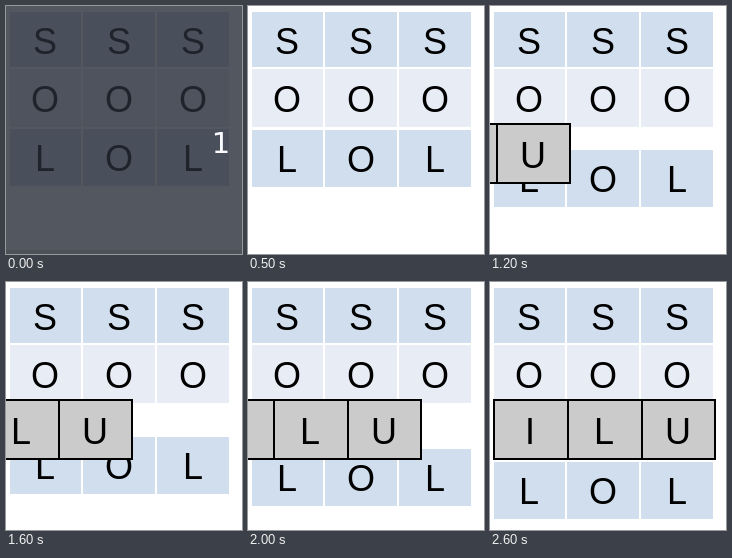
Write an HTML page with a canvas that moves like this. It is 236 px wide and 248 px high and loops after 3400 ms.

```html
<!DOCTYPE html>
<html lang="en">
<head>
<meta charset="utf-8">
<title>Row insertion</title>
<style>
html, body { margin: 0; width: 100%; height: 100%; overflow: hidden; background: #fff; }
canvas { display: block; }
</style>
</head>
<body>
<canvas id="stage" width="236" height="248"></canvas>
<script>
const ctx = document.getElementById('stage').getContext('2d');
const LOOP = 3400, STEP = 100;
const BLUE = '#d0deee', PALE = '#e8ecf5', GREY = '#cbcbcb';

function rect(x, y, w, h, color) {
  ctx.fillStyle = color;
  ctx.fillRect(x, y, w, h);
}

function letter(ch, x, y) {
  ctx.fillStyle = '#000';
  ctx.font = '36px "Liberation Sans", Arial, sans-serif';
  ctx.textAlign = 'center';
  ctx.fillText(ch, x, y);
}

function tableRow(text, top, height, baseline, color) {
  [...text].forEach((ch, i) => {
    const left = i ? 3 + 74 * i : 4;
    rect(left, top, 75 + 74 * i - left, height, color);
    letter(ch, 39 + 74 * i, baseline);
  });
}

function newRow(right) {
  const left = right - 223;
  rect(left, 117, 223, 61, '#000');
  [...'ILU'].forEach((ch, i) => {
    rect(left + 2 + 74 * i, 119, i < 2 ? 72 : 71, 57, GREY);
    letter(ch, left + 37 + 74 * i, 162);
  });
}

function countdown() {
  rect(0, 0, 236, 248, 'rgba(40,44,54,.796)');
  rect(0, 244, 236, 4, 'rgba(40,40,46,.12)');
  ctx.fillStyle = '#fafaff';
  ctx.font = '29px "DejaVu Sans", sans-serif';
  ctx.fillText('1', 215, 147);
}

function draw(t) {
  // Motion advances in steps, with one pause near the end.
  let step = Math.floor(t / STEP);
  if (step > 22) step--;
  const time = step * STEP;
  const top = Math.round(Math.min(180, 123 + Math.max(0, 0.0285 * (time - 470))));
  const right = Math.round(Math.min(226, 34 + 0.1165 * (time - 800)));

  rect(0, 0, 236, 248, '#fff');
  tableRow('SSS', 6, 55, 48, BLUE);
  tableRow('OOO', 63, 58, 106, PALE);
  tableRow('LOL', top, 57, top + 42, BLUE);
  if (right > 0) newRow(right);
  if (t < STEP) countdown();
}

const start = performance.now();
function tick() {
  draw((performance.now() - start) % LOOP);
  requestAnimationFrame(tick);
}
tick();
</script>
</body>
</html>
```
